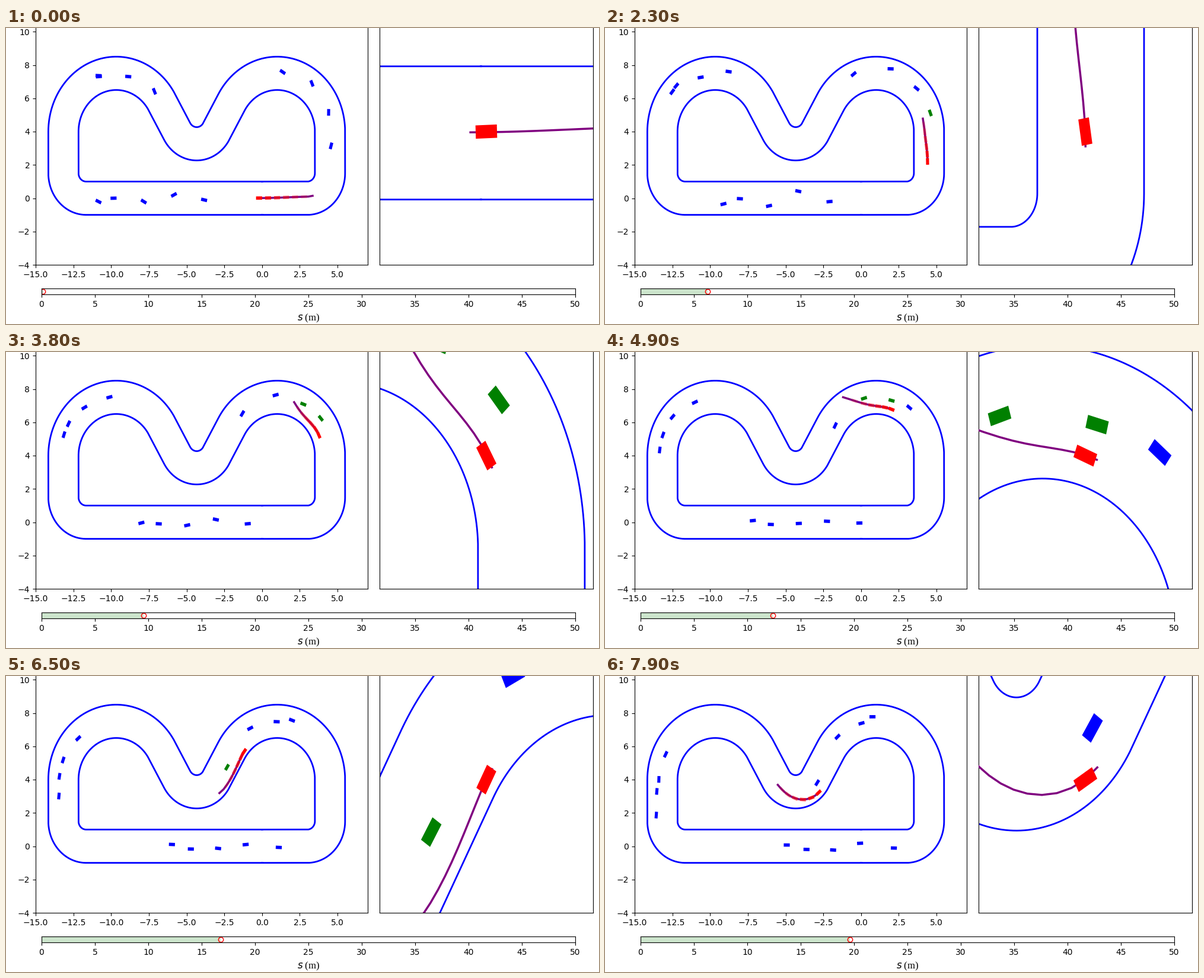
A matplotlib script for the animation above (8 s loop, 1000 by 500 pixels).

```python
import numpy as np
import matplotlib.pyplot as plt
from matplotlib.animation import FuncAnimation
from matplotlib.collections import PolyCollection
from matplotlib.patches import Rectangle

FRAMES, STEP = 80, 0.1
SPAN = FRAMES * STEP
AHEAD = 12       # steps in the planned path
SIGHT = 3.3      # arc length ahead in which a vehicle counts as relevant

# Centre line: (length, signed radius), radius 0 is straight
CORNER = (0.75 * np.pi, 1.5)
HUMP = (3.5 * np.pi * 5 / 6, 3.5)
SEGMENTS = [(3, 0), CORNER, (2.5, 0), HUMP, (2, 0), (np.pi, -1.5), (2, 0), HUMP,
            (2.5, 0), CORNER, (11.66, 0)]
ends = np.cumsum([0] + [length for length, _ in SEGMENTS])
turns = np.cumsum([0] + [length / r if r else 0 for length, r in SEGMENTS])
LAP = ends[-1]
S = np.linspace(0, LAP, 6001)
HEAD = np.interp(S, ends, turns)
mid = (HEAD[1:] + HEAD[:-1]) / 2
X = np.append(0, np.cumsum(np.cos(mid))) * S[1]
Y = np.append(0, np.cumsum(np.sin(mid))) * S[1]

# Key points of the leading vehicle: time, arc length, offset, yaw in degrees,
# then the planned offset at two thirds and at the end of its path
KEYS = np.array([(0, 0.1, 0.02, 2, 0.07, 0.10),
                 (1.3, 4.016, 0.171, 8.6, -0.01, -0.15),
                 (2.3, 6.287, 0.1, 9.5, 0.285, 0.31),
                 (3.8, 9.559, 0.496, 3.4, 0.507, 0.10),
                 (4.9, 12.395, 0.545, -5.2, 0.27, -0.635),
                 (6.5, 16.79, 0.746, 3.75, 0.807, 0.68),
                 (7.9, 19.63, 0.662, -6.7, 0.25, 0.107)])
T = KEYS[:, 0]
RATES = np.gradient(KEYS, T, axis=0)

# Other vehicles: start, speed, first offset, drift over the loop, swing
START, SPEED, OFFSET, DRIFT, SWING = np.array([
    (7, 0.833, -0.07, -0.20, -0.25),
    (9, 0.675, -0.10, 0.10, -0.30),
    (11, 0.645, -0.20, 0.10, -0.42),
    (13, 0.775, -0.10, 0.35, -0.50),
    (25, 0.862, 0.00, -0.10, -0.35),
    (27, 0.799, 0.10, -0.35, 0.20),
    (29, 0.637, -0.06, -0.30, -0.25),
    (29, 0.817, 0.00, -0.40, -0.20),
    (39, 0.749, -0.20, 0.30, -0.45),
    (40, 0.788, 0.00, -0.20, 0.05),
    (42, 0.758, -0.20, 0.00, -0.50),
    (44, 0.731, 0.20, -0.05, 0.45),
    (46, 0.761, -0.10, 0.00, -0.20)]).T


def pose(s, n):
    """Point at arc length s and left offset n, with the track heading."""
    s = np.mod(s, LAP)
    head = np.interp(s, S, HEAD)
    return (np.interp(s, S, X) - n * np.sin(head),
            np.interp(s, S, Y) + n * np.cos(head), head)


def box(x, y, head):
    """Corners of a vehicle, 0.4 long and 0.2 wide."""
    a, b = np.array([0.2, 0.2, -0.2, -0.2]), np.array([0.1, -0.1, -0.1, 0.1])
    c, d = np.cos(head), np.sin(head)
    return np.column_stack([x + a * c - b * d, y + a * d + b * c])


def lead(t):
    """Arc length and offset of the leading vehicle, eased between key points."""
    i = np.clip(np.searchsorted(T, t, side="right") - 1, 0, len(T) - 2)
    h = T[i + 1] - T[i]
    u = (t - T[i]) / h
    rise = 3 * u**2 - 2 * u**3
    vals = (KEYS[i] * (1 - rise) + KEYS[i + 1] * rise
            + h * u * (1 - u) * ((1 - u) * RATES[i] - u * RATES[i + 1]))
    return vals[1], vals[2]


def plan(t):
    """Path planned one step ago at constant speed, leaving along the track."""
    s0, n0 = lead(t - STEP)
    u = np.linspace(0, 1, AHEAD + 1)
    late, last = (np.interp(t, T, KEYS[:, k]) - n0 for k in (4, 5))
    b = 6.75 * late - 2 * last
    return s0 + AHEAD * (lead(t)[0] - s0) * u, n0 + b * u**2 + (last - b) * u**3


def traffic(t):
    """Arc length, offset and yaw of the others: drift plus a fading weave."""
    def offset(t):
        weave = np.exp(-t / 4) * np.sin(2 * np.pi * t / 7.4)
        return OFFSET + DRIFT * t / SPAN + SWING * weave

    rate = (offset(t + 0.01) - offset(t)) / 0.01
    return START + SPEED * t, offset(t), np.arctan2(rate, SPEED)


fig = plt.figure(figsize=(10, 5), dpi=100, facecolor="white")
world = fig.add_axes([0.05, 0.2, 0.56, 0.9])
zoom = fig.add_axes([0.63, 0.2, 0.36, 0.9], xticks=[], yticks=[])
bar = fig.add_axes([0.06, 0.1, 0.9, 0.02], yticks=[])
bar.set_xlabel("$s$ (m)", fontname="Liberation Serif", fontsize=12, labelpad=5.3)

paths, crowds = [], []
for ax in (world, zoom):
    for side in (1, -1):
        ax.plot(*pose(np.append(S[:-1], LAP - 1e-6), side)[:2], color="blue", lw=2)
    paths.append(ax.plot([], [], color="purple", lw=2.5, zorder=3)[0])
    crowds.append(ax.add_collection(PolyCollection([], lw=0, zorder=4), autolim=False))
ghosts = world.add_collection(PolyCollection([], lw=0, zorder=5), autolim=False)
ghosts.set_facecolor([(1, 0, 0, a) for a in np.linspace(1, 0, AHEAD // 2 + 1)])
car = zoom.add_collection(PolyCollection([], lw=0, zorder=5, facecolor="red"),
                          autolim=False)
done = bar.add_patch(Rectangle((0, 0), 0, 1, fc="green", alpha=0.2, lw=0))
knob, = bar.plot([], [], "o", mfc="none", mec="red", ms=6)
world.set(xticks=np.arange(-15, 7, 2.5), yticks=range(-4, 13, 2),
          xlim=(-15, 7), ylim=(-4, 12))
bar.set(xticks=range(0, 51, 5), xlim=(0, 50), ylim=(0, 1))


def draw(frame):
    t = frame * STEP
    s, n = lead(t)
    x, y, head = pose(s, n)
    ps, pn = plan(t)
    px, py, track = pose(ps, pn)
    aim = track + np.arctan(np.gradient(pn, ps))

    vs, vn, yaw = traffic(t)
    vx, vy, vhead = pose(vs, vn)
    boxes = [box(*v) for v in zip(vx, vy, vhead + yaw)]
    colors = np.where((vs - ps[0]) % LAP < SIGHT, "green", "blue")
    for line, crowd in zip(paths, crowds):
        line.set_data(px, py)
        crowd.set_verts(boxes)
        crowd.set_facecolor(colors.tolist())

    ghosts.set_verts([box(*p) for p in zip(px[::2], py[::2], aim[::2])])
    car.set_verts([box(x, y, head + np.radians(np.interp(t, T, KEYS[:, 3])))])
    zoom.set(xlim=(x - 2, x + 2), ylim=(y - 2, y + 2))
    done.set_width(s)
    knob.set_data([s], [0.5])
    return []


anim = FuncAnimation(fig, draw, frames=FRAMES, init_func=lambda: draw(0),
                     interval=1000 * STEP, repeat=True, repeat_delay=0)
plt.show()
```
